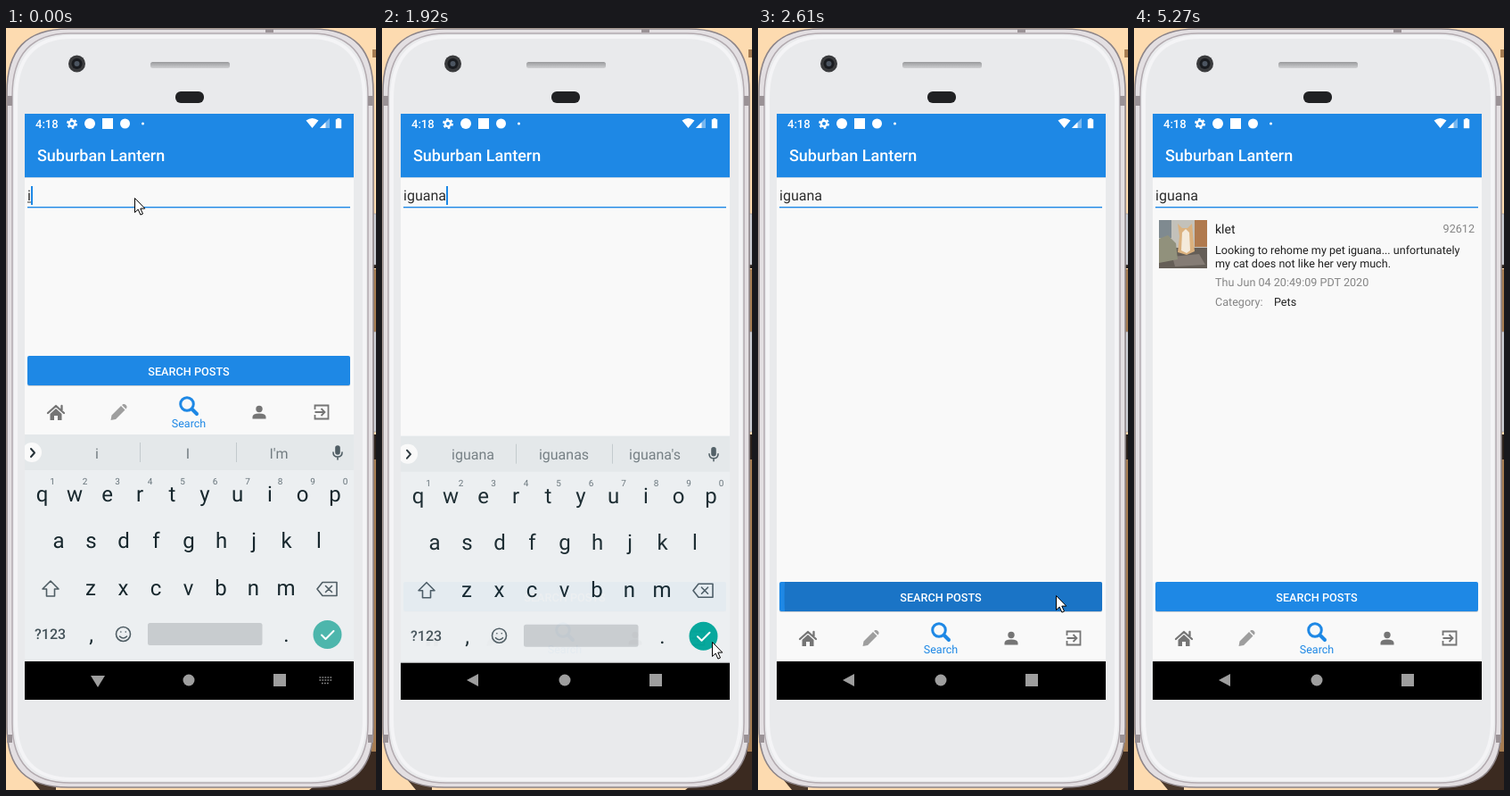
An HTML page for the animation above (5.52 s loop, 415 by 853 pixels).

```html
<!DOCTYPE html>
<html lang="en">
<head>
<meta charset="utf-8">
<title>Search demo</title>
<style>
html, body { margin: 0; width: 100%; height: 100%; overflow: hidden; }
svg { display: block; }
text { font-family: Roboto, sans-serif; text-rendering: geometricPrecision; }
.mid { text-anchor: middle; }
.line { fill: none; stroke-linecap: round; stroke-linejoin: round; }
</style>
</head>
<body>
<svg width="415" height="853" viewBox="0 0 415 853">
  <defs>
    <clipPath id="screen"><rect x="21" y="96" width="369" height="656"/></clipPath>
    <clipPath id="button"><rect x="24" y="367" width="362" height="33" rx="2"/></clipPath>
    <clipPath id="photo"><rect x="28" y="215" width="54" height="54"/></clipPath>
    <linearGradient id="slot" x2="0" y2="1"><stop stop-color="#999a9c"/><stop offset="1" stop-color="#cfd0d2"/></linearGradient>
  </defs>

  <!-- desk -->
  <rect width="415" height="853" fill="#fddbb0"/>
  <path d="M24 836l32 12v5H38z" fill="#4a382b"/>
  <path d="M340 853l75-56v56z" fill="#3b2a20"/>
  <path d="M411 24h4v9h-4zM409 270h6v180h-6zM410 480h5v330h-5z" fill="#a57c52"/>
  <path d="M411 265h4v4h-4zM411 455h4v28h-4z" fill="#2b211b"/>
  <path d="M411 208h4v57h-4zM411 340h4v112h-4z" fill="#d5d7dd" stroke="#8f8b92" stroke-width=".6"/>

  <!-- phone -->
  <path d="M1 72C1 25 22 1 70 1H344C392 1 412 25 412 72V782C412 828 392 850 344 850H70C22 850 1 828 1 782z" fill="#e3dfe2" stroke="#8d8589" stroke-width="1.6"/>
  <path d="M7 76C7 30 28 6 72 6H342C385 6 406 30 406 76V778C406 822 385 845 342 845H72C28 845 7 822 7 778z" fill="#e9eaec" stroke="#b3abb0" stroke-width="1.5"/>
  <path d="M11 80C11 34 32 10 74 10H340C381 10 402 34 402 80V774C402 818 381 841 340 841H74C32 841 11 818 11 774z" fill="none" stroke="#f4f4f6" stroke-width="4"/>
  <path d="M1 76h6v11H1zM406 76h6v11h-6zM1 791h6v9H1zM406 791h6v9h-6zM291 1h9v4h-9z" fill="#9a9296"/>
  <circle cx="79.500" cy="40" r="9.500" fill="#3a3b3d"/>
  <circle cx="79.500" cy="40" r="6" fill="#191b1f"/>
  <circle cx="79.500" cy="40" r="3" fill="#4c5561"/>
  <rect x="162" y="38" width="89" height="7" rx="2.500" fill="url(#slot)"/>
  <rect x="190" y="71" width="32" height="13" rx="6" fill="#202123"/>

  <g clip-path="url(#screen)">
    <rect x="21" y="96" width="369" height="656" fill="#f9f9f9"/>

    <!-- status and app bar -->
    <rect x="21" y="167" width="369" height="1" fill="#c3d6e6"/>
    <rect x="21" y="96" width="369" height="71" fill="#1e88e5"/>
    <g fill="#fff">
      <text x="33" y="111.500" font-size="13" font-weight="500">4:18</text>
      <circle cx="74" cy="107" r="3.200" fill="none" stroke="#fff" stroke-width="2.400"/>
      <circle cx="74" cy="107" r="5" fill="none" stroke="#fff" stroke-width="2" stroke-dasharray="2.600 2.636"/>
      <circle cx="94" cy="107" r="6"/>
      <rect x="108" y="101" width="12" height="12"/>
      <circle cx="133.500" cy="107" r="5.500"/>
      <circle cx="153.500" cy="107" r="1.500"/>
      <path d="M336.500 103.500Q343.500 98.500 350.500 103.500L343.500 112z"/>
      <path d="M363 101v11h-11z" fill-opacity=".4"/>
      <path d="M358.500 105.500v6.500H352z"/>
      <path d="M371.500 101h3v1.200h1.700v10h-6.400v-10h1.700z"/>
      <text x="35" y="149" font-size="18" font-weight="500">Suburban Lantern</text>
    </g>

    <!-- input -->
    <text id="query" x="24" y="193" font-size="16" fill="#2c2c2c"></text>
    <rect id="compose" x="24" y="194.500" height="1" fill="#333"/>
    <rect id="caret" y="177" width="2" height="21" fill="#1e88e5"/>
    <rect x="24" y="200" width="362" height="1.400" fill="#1e88e5"/>

    <!-- found post -->
    <g id="post" font-size="12.600" fill="#212121">
      <g clip-path="url(#photo)">
        <rect x="28" y="215" width="54" height="54" fill="#c3c1ba"/>
        <path d="M28 215h14v20H28z" fill="#7f8a90"/>
        <path d="M68 215h14v30H68z" fill="#b07a4e"/>
        <path d="M28 246h54v23H28z" fill="#655e57"/>
        <path d="M43 256l30-3 7 12-34 2z" fill="#857c75"/>
        <path d="M28 236l10-4 9 9 2 18-21 4z" fill="#91917c"/>
        <path d="M49 219l5 5h6l5-5 1 12 2 19-9 4-10-3 2-18z" fill="#dbb17e"/>
        <path d="M54 229l4-4 4 4 1 20-4 3-6-3z" fill="#f4eadb"/>
      </g>
      <text x="91" y="230" font-size="14">klet</text>
      <text x="382" y="229" text-anchor="end" fill="#858585">92612</text>
      <text x="91" y="252.500">Looking to rehome my pet iguana... unfortunately</text>
      <text x="91" y="267.500">my cat does not like her very much.</text>
      <text x="91" y="289" fill="#858585">Thu Jun 04 20:49:09 PDT 2020</text>
      <text x="91" y="311" fill="#858585">Category:</text>
      <text x="157" y="311">Pets</text>
    </g>

    <!-- button and tabs -->
    <g id="tabs">
      <rect x="24" y="368" width="362" height="33" rx="2" fill="#c9ced3"/>
      <rect x="24" y="367" width="362" height="33" rx="2" fill="#1e88e5"/>
      <g clip-path="url(#button)"><circle id="ripple" cx="334" cy="384" fill="#17599b" fill-opacity=".42"/></g>
      <text class="mid" x="205" y="388.500" font-size="12.700" font-weight="500" fill="#fff">SEARCH POSTS</text>
      <g fill="#757575">
        <path class="line" d="M47 431l9-8 9 8M62.500 423v5" stroke="#757575" stroke-width="2.300"/>
        <path d="M49.500 432l6.500-6 6.500 6v7h-4.500v-5h-4v5h-4.500z"/>
        <path d="M117.500 439l1-5.500 10.500-10.500 4.500 4.500-10.500 10.500zM130 422l1.500-1q1.500-.5 3 1t1 3l-1 1.500z" fill="#9e9e9e"/>
        <circle cx="284" cy="426.500" r="3.700"/>
        <path d="M276.500 437.500v-2q0-4 7.500-4t7.500 4v2z"/>
        <path d="M346.500 427v-4.500h15v15h-15V433M346.500 430H357m-3.500-4l4 4-4 4" fill="none" stroke="#757575" stroke-width="1.800"/>
      </g>
      <g fill="none" stroke="#1e88e5">
        <circle cx="203" cy="421" r="7.300" stroke-width="3"/>
        <path class="line" d="M209 427l5 5" stroke-width="4"/>
      </g>
      <text class="mid" x="205" y="446.500" font-size="12.500" fill="#1e88e5">Search</text>
    </g>

    <rect x="21" y="709" width="369" height="43"/>

    <g id="keyboard">
      <rect x="21" y="455" width="369" height="254" fill="#eceff1"/>
      <rect x="21" y="455" width="369" height="40" fill="#e4e8ea"/>
      <circle cx="29" cy="475" r="11" fill="#fafafa"/>
      <path d="M150.500 464v22M258.500 464v22" stroke="#c3cacd"/>
      <g id="hints" class="mid" font-size="16" fill="#727c81">
        <text x="102" y="481.500"></text><text x="204" y="481.500"></text><text x="306" y="481.500"></text>
      </g>
      <g id="keys" class="mid"></g>
      <g class="line" stroke="#4f5d64" stroke-width="1.600">
        <path d="M28 471l4 4.500-4 4.500" stroke="#263238" stroke-width="2"/>
        <path d="M367 475q0 5 5 5t5-5M372 480v3"/>
        <rect x="370" y="468" width="4" height="9" rx="2" fill="#4f5d64"/>
        <path d="M50 619l9 9h-4.500v8h-9v-8H41z"/>
        <path d="M355 620.500h16v15h-16l-6-7.500zM358.500 624.500l7 7m0-7l-7 7"/>
        <circle cx="131.500" cy="678.500" r="8"/>
        <path d="M127.500 681q4 4 8 0M128.800 676h.1M134.200 676h.1"/>
      </g>
      <text x="32" y="684" font-size="16" fill="#45535a" font-weight="500">?123</text>
      <rect x="159" y="666" width="128.500" height="25" rx="2.500" fill="#c8cccf"/>
      <circle id="enter" cx="360.500" cy="679" r="16"/>
      <path class="line" d="M354 679.500l4.500 4.500 9-9" stroke="#fff" stroke-width="2"/>
    </g>

    <!-- system navigation -->
    <g fill="#9e9e9e">
      <path id="back"/>
      <circle cx="205" cy="730" r="6.500"/>
      <rect x="300" y="723" width="14" height="14"/>
      <path id="switcher" d="M351.500 727h14M351.500 730h14M354 733.500h9" stroke="#8a8a8a" stroke-width="1.700" stroke-dasharray="1.700 1.300"/>
    </g>
  </g>

  <path id="mouse" d="M.5 .5V16.500l3.700-3.400 2.700 6 2.600-1.100-2.700-5.900h5z" fill="#fff" stroke="#000"/>
</svg>
<script>
const $ = id => document.getElementById(id);
const show = (id, on) => $(id).style.display = on ? '' : 'none';
const LOOP = 5520, LAYOUT = 1860, KEYBOARD_GONE = 2085;

// time, typed text, suggestions
const typing = [
  [0, 'i', ['i', 'I', "I'm"]],
  [120, 'ig', ['ig', 'IG', "I'm"]],
  [310, 'igu', ['igu', 'iguana', 'iguanas']],
  [360, 'igua', ['igua', 'iguana', "iguana's"]],
  [540, 'iguan', ['iguan', 'iguana', 'iguanas']],
  [600, 'iguana', ['iguana', 'iguanas', "iguana's"]]
];
const blinks = [1100, 1570, 2330, 2840, 3330, 3820, 4300, 4800, 5270];

// first step, last step, number of steps, x, y
const moves = [
  [1100, 1570, 8, 347, 672],
  [1630, 1630, 1, 369, 684],
  [1690, 1920, 5, 370, 687],
  [1970, 2030, 2, 361, 678],
  [2090, 2210, 3, 356, 656],
  [2330, 2610, 5, 334, 635],
  [2660, 2840, 4, 336, 633],
  [3210, 3390, 3, 336, 632],
  [4000, 4120, 2, 336, 629],
  [4800, 5090, 6, 325, 862]
];

function addKeys() {
  let keys = '';
  const key = (c, x, y, size = 24, fill = '#17272d') =>
    keys += `<text x="${x}" y="${y}" font-size="${size}" fill="${fill}">${c}</text>`;
  [['qwertyuiop', 40.5, 530], ['asdfghjkl', 59, 582], ['zxcvbnm', 95, 635]].forEach(([row, x, y], r) =>
    [...row].forEach((c, i) => {
      key(c, x + i * 36.5, y);
      if (!r) key((i + 1) % 10, x + 11.5 + i * 36.5, 511, 10, '#66737a');
    }));
  key(',', 95.5, 687);
  key('.', 314.5, 687);
  $('keys').innerHTML = keys;
}

function mouseAt(t) {
  let x = 144, y = 190;
  for (const [from, to, steps, toX, toY] of moves) {
    if (t < from) break;
    const gap = (to - from) / (steps - 1) || 1;
    const p = Math.min(steps, Math.floor((t - from) / gap) + 1) / steps;
    const eased = steps > 7 ? p * p * (3 - 2 * p) : p;
    x += (toX - x) * eased;
    y += (toY - y) * eased;
  }
  return [x, y];
}

function draw(t) {
  const [, text, hints] = typing.filter(s => s[0] <= t).pop();
  const lowered = t >= LAYOUT;
  $('query').textContent = text;
  [...$('hints').children].forEach((el, i) => el.textContent = hints[i]);
  const width = $('query').getComputedTextLength();
  $('compose').setAttribute('width', width);
  $('caret').setAttribute('x', Math.round(24 + width));
  show('compose', !lowered);
  show('caret', blinks.filter(b => b <= t).length % 2 === 0);
  show('post', t >= 2700);
  $('tabs').setAttribute('transform', `translate(0 ${lowered ? 253 : 0})`);

  // the keyboard sinks and fades in three steps
  const step = Math.floor((t - LAYOUT) / 55);
  const p = Math.max(0, Math.min(1, step / 3)) ** 3;
  show('keyboard', t < KEYBOARD_GONE);
  $('keyboard').setAttribute('transform', `translate(0 ${46 * p})`);
  $('keyboard').setAttribute('opacity', 1 - .92 * p);
  $('enter').setAttribute('fill', t < 1690 ? '#4db6ac' : '#00a69a');
  show('switcher', !lowered);
  $('back').setAttribute('d', lowered ? 'M108 723v14l-13-7z' : 'M95 725h16l-8 13z');

  $('ripple').setAttribute('r', Math.max(0, (t - 2440) * 1.78));
  $('ripple').setAttribute('opacity', Math.max(0, Math.min(1, (2840 - t) / 160)));
  $('mouse').setAttribute('transform', `translate(${mouseAt(t)})`);
}

addKeys();
const start = performance.now();
(function tick() {
  draw((performance.now() - start) % LOOP);
  requestAnimationFrame(tick);
})();
</script>
</body>
</html>
```
